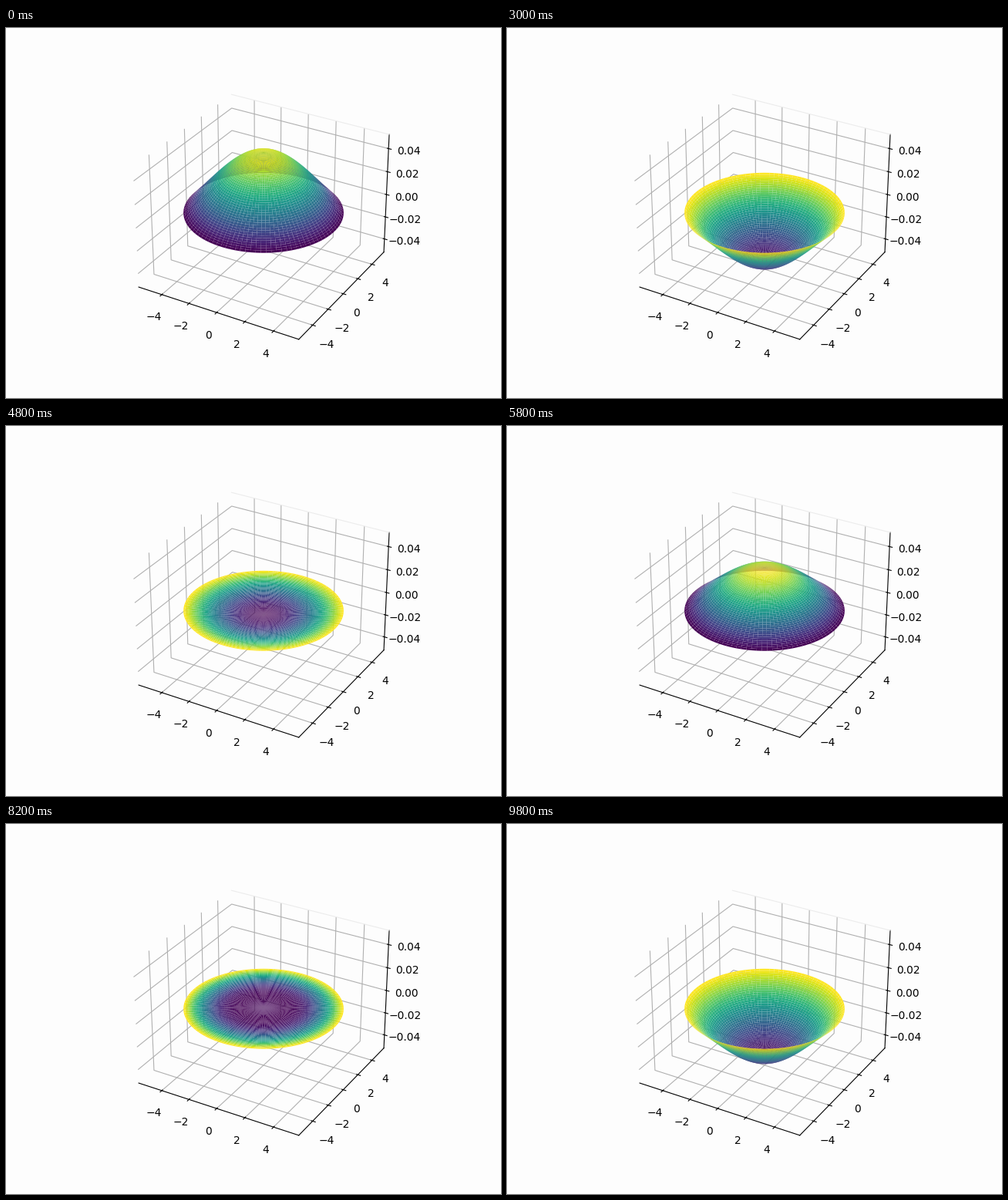
A matplotlib script that plays this animation: 642 by 480 pixels, repeating every 10 s.

```python
import numpy as np
import matplotlib.pyplot as plt
from matplotlib.animation import FuncAnimation
from mpl_toolkits.mplot3d.art3d import Poly3DCollection

FRAMES, INTERVAL = 50, 200
RADIUS, HEIGHT = 5.0, 0.05
K1, K2 = 2.4048, 5.5201          # zeros of the Bessel function J0
W1 = np.radians(11.0)            # phase step per frame
W2 = W1 * K2 / K1
DAMPING = 0.0021
BACK = "#fdfdfd"


def j0(x):
    theta = (np.arange(64) + 0.5) * np.pi / 64
    return np.cos(np.multiply.outer(x, np.sin(theta))).mean(axis=-1)


r = np.linspace(0, RADIUS, 50)
phi = np.linspace(0, 2 * np.pi, 100)
X = np.outer(r, np.cos(phi))
Y = np.outer(r, np.sin(phi))
MODE1 = j0(K1 * r / RADIUS)
MODE2 = j0(K2 * r / RADIUS)


def profile(n):
    fade = np.exp(-DAMPING * n)
    return HEIGHT * fade * (MODE1 * np.cos(W1 * n)
                            - 0.006 * MODE2 * np.sin(W2 * n))


def quads(n):
    Z = np.repeat(profile(n)[:, None], len(phi), axis=1)
    P = np.stack([X, Y, Z], axis=-1)
    cells = np.stack([P[:-1, :-1], P[1:, :-1], P[1:, 1:], P[:-1, 1:]], axis=2)
    return cells.reshape(-1, 4, 3)


fig = plt.figure(figsize=(6.42, 4.80), dpi=100, facecolor=BACK)
ax = fig.add_subplot(projection="3d", facecolor=BACK)
for axis in (ax.xaxis, ax.yaxis, ax.zaxis):
    axis.set_pane_color((1, 1, 1, 0))

side, top = 5.5 * 25 / 24, HEIGHT * 25 / 24
ax.plot([-side, side], [side, side], [top, top], color="#ececec", lw=0.8)

surface = Poly3DCollection(quads(0), cmap="viridis")
ax.add_collection3d(surface)
ax.set(xlim=(-side, side), ylim=(-side, side), zlim=(-top, top))


def update(n):
    cells = quads(n)
    level = cells[:, :, 2].mean(axis=1)
    surface.set_verts(cells)
    surface.set_array(level)
    surface.set_clim(level.min(), level.max())
    return surface,


anim = FuncAnimation(fig, update, frames=FRAMES, interval=INTERVAL,
                     init_func=lambda: update(0), repeat=True,
                     repeat_delay=0, blit=False)
plt.show()
```
